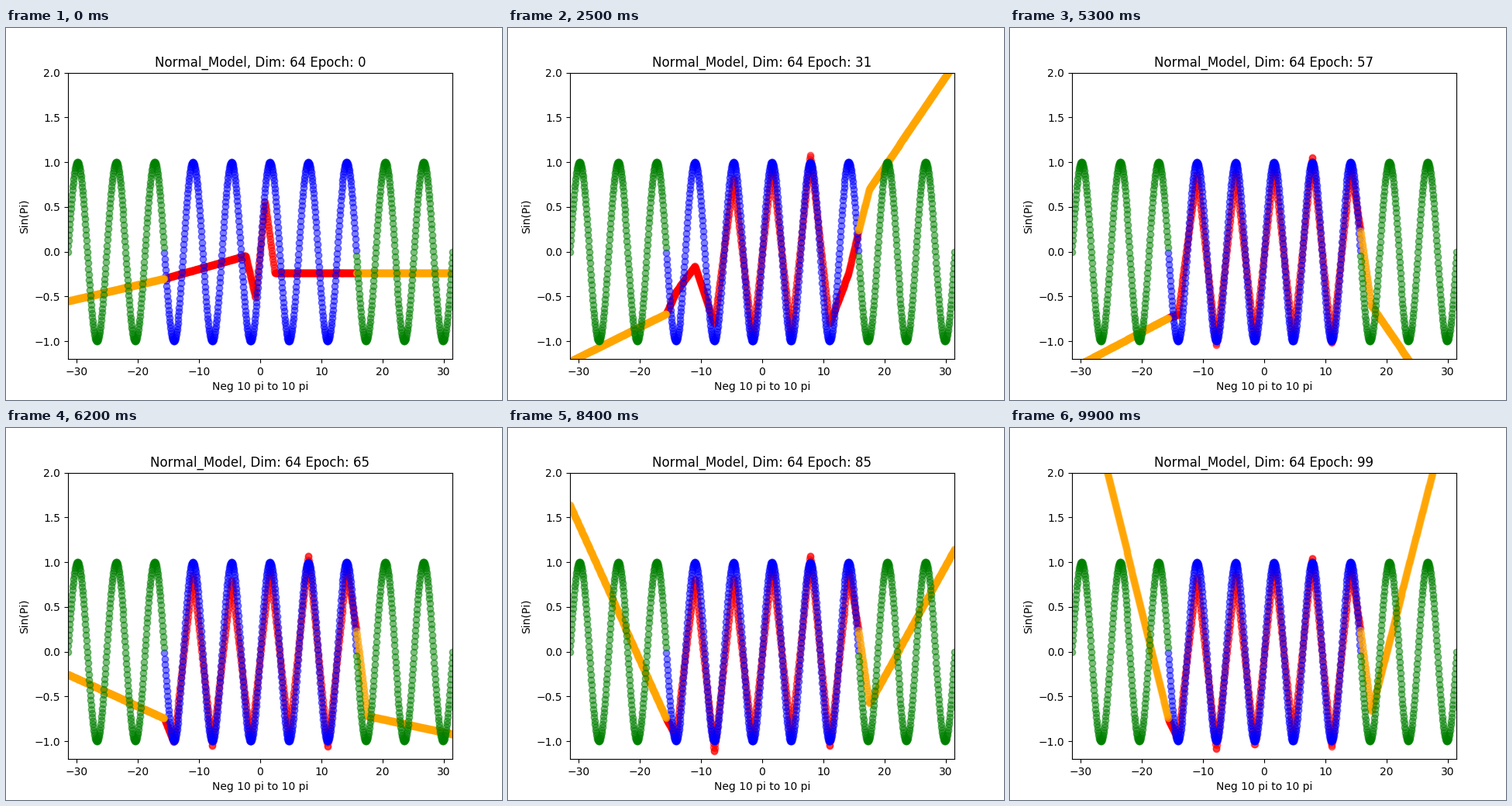
A matplotlib script that plays this animation: 640 px wide and 480 px high, repeating every 10 s.

```python
import matplotlib.pyplot as plt
import numpy as np
from matplotlib.animation import FuncAnimation

plt.rcParams["text.kerning_factor"] = 6

PI = np.pi
EDGE = 5 * PI
END = 10 * PI
TURN = 17.5
X = np.linspace(-END, END, 1000)
INNER = np.abs(X) <= EDGE

# Crests and troughs of the trained range, and the heights the fit settles at
EXTREMES = (np.arange(10) - 4.5) * PI
SETTLED = np.array([-.98, .86, -1.1, .86, -1, .95, -.97, 1.08, -1.04, .92])

# Extrapolation: left slope, height of the right-hand bend, slope after it
STAGES = [0, 31, 46, 57, 72, 85, 99]
LEFT_SLOPE = [.016, .034, .25, .036, -.09, -.152, -.277]
BEND = [-.24, .7, -.05, -.6, -.82, -.58, -.67]
RIGHT_SLOPE = [0, .101, -.217, -.1, .06, .124, .267]

# Plots were saved one per epoch and shown in file-name order: 0, 1, 10, 11, ...
EPOCHS = sorted(range(100), key=str)


def predict(epoch):
    """Piecewise linear fit that learns the sine from the centre outwards."""
    left = -.3 - .45 * (1 - np.exp(-epoch / 15))
    right = -.24 + .5 * (1 - np.exp(-epoch / 12))
    xs = EXTREMES * (1 - .5 * np.exp(-epoch / 5))

    # The left side is learned later than the right
    distance = np.abs(EXTREMES) * np.where(EXTREMES < 0, 1.4, 1)
    learned = np.clip((epoch + 13 - 3.2 * distance) / 12, 0, 1)
    flat = np.where(xs < 0, left * (np.abs(xs) / EDGE) ** (1 + epoch / 10), -.24)
    noise = np.random.default_rng(epoch).normal(0, .03, len(xs))
    ys = flat + (SETTLED + noise - flat) * learned

    fall, bend, rise = (np.interp(epoch, STAGES, v) for v in (LEFT_SLOPE, BEND, RIGHT_SLOPE))
    return np.interp(
        X,
        [-END, -EDGE, *xs, EDGE, TURN, END],
        [left - fall * (END - EDGE), left, *ys, right, bend, bend + rise * (END - TURN)])


fig, ax = plt.subplots(figsize=(6.4, 4.8), dpi=100)
ax.set(xlim=(-END, END), ylim=(-1.2, 2), xlabel="Neg 10 pi to 10 pi", ylabel="Sin(Pi)")
title = ax.set_title("")


def dots(mask, color):
    return ax.scatter(X[mask], np.sin(X[mask]), color=color, alpha=.5)


fit_in = dots(INNER, "red")
dots(INNER, "blue")
fit_out = dots(~INNER, "orange")
dots(~INNER, "green")


def update(i):
    epoch = EPOCHS[i]
    y = predict(epoch)
    for fit, mask in ((fit_in, INNER), (fit_out, ~INNER)):
        fit.set_offsets(np.column_stack([X[mask], y[mask]]))
    title.set_text(f"Normal_Model, Dim: 64 Epoch: {epoch}")
    return fit_in, fit_out, title


anim = FuncAnimation(fig, update, frames=len(EPOCHS), interval=100, repeat=True, repeat_delay=0)
plt.show()
```
